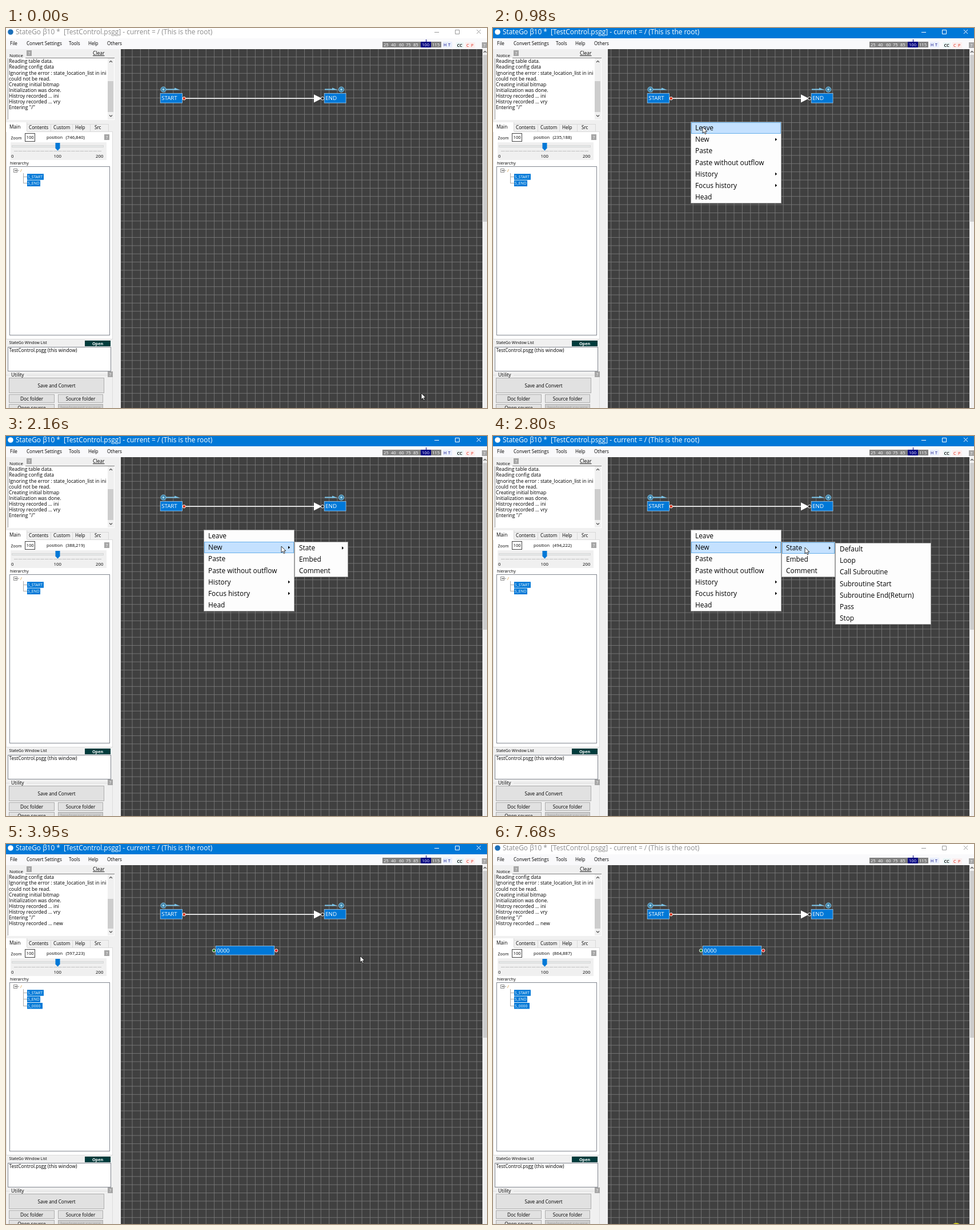
Recreate the animation shown at these times as an HTML page. Size 842 by 665 pixels, loop 7770 ms.

```html
<!DOCTYPE html>
<html lang="en">
<head>
<meta charset="utf-8">
<title>State editor</title>
<style>
html, body { margin: 0; width: 100%; height: 100%; overflow: hidden; background: #f0f0f0; }
svg { display: block; }
text { font-family: "Open Sans", "Noto Sans", sans-serif; white-space: pre; }
rect, .crisp { shape-rendering: crispEdges; }
.smooth { shape-rendering: geometricPrecision; }
</style>
</head>
<body>
<svg id="stage" width="842" height="665" viewBox="0 0 842 665"></svg>
<script>
const LOOP = 7770;
const BLUE = '#0078d7';
const stage = document.getElementById('stage');

function add(parent, tag, attrs, content) {
  const el = document.createElementNS('http://www.w3.org/2000/svg', tag);
  for (const k in attrs) el.setAttribute(k, attrs[k]);
  if (content !== undefined) el.textContent = content;
  parent.appendChild(el);
  return el;
}
const group = (parent = stage) => add(parent, 'g', {});
const show = (el, on) => el.setAttribute('visibility', on ? 'visible' : 'hidden');

// Edges are pixel coordinates; bordered boxes are inset by half a pixel.
function box(parent, x, y, w, h, fill, stroke) {
  const d = stroke ? 0.5 : 0;
  return add(parent, 'rect', { x: x + d, y: y + d, width: w - 2 * d, height: h - 2 * d, fill, stroke: stroke || 'none' });
}
const label = (parent, x, y, size, str, fill = '#000', more = {}) =>
  add(parent, 'text', { x, y, 'font-size': size, fill, ...more }, str);
const path = (parent, d, stroke, more = {}) => add(parent, 'path', { d, stroke, fill: 'none', ...more });
const dot = (parent, cx, cy, r, fill, stroke = 'none') => add(parent, 'circle', { cx, cy, r, fill, stroke });

function helpMark(x, y) {
  box(stage, x, y, 9, 10, '#a6a6a6');
  label(stage, x + 4.5, y + 8, 8, '?', '#fff', { 'text-anchor': 'middle' });
}
function button(x, y, w, h, str, fill = '#e1e1e1', color = '#000', size = 8.3) {
  box(stage, x, y, w, h, fill, '#adadad');
  label(stage, x + w / 2, y + h / 2 + 3, size, str, color, { 'text-anchor': 'middle' });
}
const chevron = (x, y, dir) => path(stage, `M${x - 2.5} ${y + dir}l2.5 ${-2.5 * dir}l2.5 ${2.5 * dir}`, '#505050', { 'stroke-width': 1.2 });

// Title bar
const titleBack = box(stage, 0, 0, 842, 18, '#fff');
const titleIcon = dot(stage, 8, 7, 4.8, BLUE);
const titleText = label(stage, 17, 11, 11.9, 'StateGo β10 *  [TestControl.psgg] - current = / (This is the root)');
const titleButtons = path(stage, 'M750 7.5h8M786.5 3.5h7v7h-7zM824 3l7 7M831 3l-7 7', '#999');

// Menu bar
box(stage, 0, 18, 842, 19, '#f9f9fb');
[[7, 'File'], [36, 'Convert Settings'], [110, 'Tools'], [144, 'Help'], [177, 'Others']]
  .forEach(([x, s]) => label(stage, x, 30.3, 8.1, s));
box(stage, 659, 24, 103, 10, '#808080');
box(stage, 726, 24, 18, 10, '#000080');
box(stage, 735, 20, 1, 4, '#000080');
[[661, 25], [674, 40], [688, 60], [700, 75], [713, 85], [728, 100], [746, 115]]
  .forEach(([x, s]) => label(stage, x, 31.7, 7.6, s, '#fff'));
box(stage, 765, 24, 16, 10, '#e8eefc');
box(stage, 804, 25, 17, 10, '#fbeeee');
box(stage, 788, 25, 13, 10, '#eaf6f6');
label(stage, 766, 31.7, 7, 'H', '#000080');
label(stage, 774, 31.7, 7, 'T', '#000080');
label(stage, 789.5, 32.8, 7.5, 'CC', '#000', { 'font-weight': 600 });
label(stage, 806, 32.8, 7, 'C', '#e02010');
label(stage, 814, 32.8, 7, 'P', '#e02010');
helpMark(833, 25);

// Side panel: notices
box(stage, 0, 37, 201, 628, '#f0f0f0');
helpMark(36, 39);
box(stage, 3, 52, 187, 109, '#fff');
box(stage, 34, 52, 156, 1, '#808080');
box(stage, 3, 53, 1, 107, '#a0a0a0');
label(stage, 6, 51.4, 8, 'Notice');
label(stage, 152, 47, 8.5, 'Clear', '#000', { 'text-decoration': 'underline' });
box(stage, 178, 53, 11, 107, '#f0f0f0');
chevron(183.5, 59, 1);
chevron(183.5, 153.5, -1);
const noticeThumb = box(stage, 178, 93, 10, 54, '#cdcdcd');
const notices = ['Reading table data.', 'Reading config data', 'Ignoring the error : state_location_list in ini',
  'could not be read.', 'Creating initial bitmap', 'Initialization was done.', 'Histroy recorded ... ini',
  'Histroy recorded ... vry', 'Entering "/"', 'Histroy recorded ... new'];
const noticeLines = notices.slice(0, 9).map((s, i) => label(stage, 5, 61.4 + i * 10.05, 8.6, s));

// Side panel: tabs
box(stage, 0, 181, 187, 364, '#fff', '#dcdcdc');
box(stage, 36, 168, 144, 14, '#f0f0f0', '#d9d9d9');
[78, 116, 147].forEach(x => box(stage, x, 168, 1, 13, '#d9d9d9'));
box(stage, 0, 165, 37, 17, '#fff');
box(stage, 36, 165, 1, 16, '#d9d9d9');
label(stage, 6, 176, 8.3, 'Main');
[[40, 'Contents'], [83, 'Custom'], [121, 'Help'], [155, 'Src']].forEach(([x, s]) => label(stage, x, 177.3, 8.15, s));
label(stage, 8.5, 194.5, 7, 'Zoom');
box(stage, 33, 184, 18, 15, '#fff', '#444');
label(stage, 35.5, 194.3, 7.7, '100');
label(stage, 71, 194, 7.45, 'position');
const posText = label(stage, 104.5, 194, 7.8, '');
helpMark(172, 186);
box(stage, 8, 200, 168, 31, '#f0f0f0');
box(stage, 10, 205, 161, 4, '#e7eaea', '#d6d6d6');
path(stage, 'M14 215.5H168', '#c0c0c0', { 'stroke-dasharray': '6.7 1' });
path(stage, 'M86.5 201h8v9.2l-4 4.6l-4-4.6z', 'none', { fill: BLUE });
[[9, 0], [83.5, 100], [157, 200]].forEach(([x, s]) => label(stage, x, 227.3, 7.8, s));

// Side panel: hierarchy
label(stage, 7, 239.3, 7.5, 'hierarchy');
box(stage, 6, 242, 176, 296, '#fff', '#828790');
box(stage, 13, 246, 7, 7, '#fff', '#919191');
path(stage, 'M14.5 249.5h4', '#444', { class: 'crisp' });
path(stage, 'M20 249.5h3M30.5 254v18M30 260.5h7M30 271.5h7', '#a8a8a8', { class: 'crisp' });
label(stage, 25, 252, 7.5, '/', '#d08a20');
function treeItem(parent, y, w, s) {
  box(parent, 37, y, w, 10.5, BLUE).setAttribute('class', 'smooth');
  label(parent, 38, y + 7.8, 6.8, s, '#fff');
}
treeItem(stage, 255.2, 29, 'S_START');
treeItem(stage, 266.6, 23, 'S_END');
const newItem = group();
path(newItem, 'M30.5 272v11.5h7', '#a8a8a8', { class: 'crisp' });
treeItem(newItem, 278, 27, 'S_0000');

// Side panel: window list and utility
label(stage, 5.5, 553.3, 6.9, 'StateGo Window List');
box(stage, 138, 547, 45, 10, '#003c3c');
label(stage, 160.5, 555, 7.2, 'Open', '#fff', { 'text-anchor': 'middle', 'font-weight': 700 });
box(stage, 3, 558, 181, 43, '#fff', '#828790');
label(stage, 5.5, 567, 8.4, 'TestControl.psgg (this window)');
path(stage, 'M0 607.5h6M36 607.5h150.5V665', '#dcdcdc', { class: 'crisp' });
label(stage, 9, 610, 8.4, 'Utility');
helpMark(178, 601);
button(5, 612, 167, 27, 'Save and Convert', '#e1e1e1', '#000', 8.15);
button(5, 641, 80, 15, 'Doc folder');
button(91, 641, 79, 15, 'Source folder');
button(5, 658, 80, 14, 'Open source');
button(91, 658, 79, 14, 'Implement source', '#cccccc', '#a0a0a0');

// Work area with a grid of 20 units, drawn slightly reduced
const SCALE = 1.393;
const PITCH = 20 / SCALE;
box(stage, 201, 37, 633, 628, '#404040');
let grid = '';
for (let x = 192.3 + PITCH; x < 834; x += PITCH) grid += `M${x} 37V665`;
for (let y = 36.3 + PITCH; y < 665; y += PITCH) grid += `M201 ${y}H834`;
path(stage, grid, '#7c7c7c', { 'stroke-width': 0.85 });
box(stage, 834, 37, 8, 628, '#f0f0f0');
box(stage, 835, 47, 7, 292, '#cdcdcd');
chevron(838.5, 42, 1);

function node(parent, x, y, w, h, s) {
  add(parent, 'rect', { x, y, width: w, height: h, fill: BLUE, stroke: '#a4d0f4', 'stroke-width': 0.8, class: 'smooth' });
  label(parent, x + 2, y + 11.5, 9.7, s, '#fff');
}
const port = (parent, x, y, fill) => dot(parent, x, y, 2.7, fill, '#fff');
function badge(ring, tail, tip) {
  dot(stage, ring, 107.6, 4.6, '#3f7fa4', '#86caec');
  dot(stage, ring, 107.6, 1.9, '#9cd8f4');
  path(stage, `M${tail} 107.5H${tip - 8}`, '#7cc4e8', { 'stroke-width': 2 });
  path(stage, `M${tip - 10} 104.5L${tip} 108.5H${tip - 10}z`, 'none', { fill: '#7cc4e8' });
}
badge(275.5, 280, 305);
badge(587, 558, 581);
path(stage, 'M314 123.3H541', '#fff', { 'stroke-width': 1.5 });
path(stage, 'M539 116.2L553 123.3L539 130.4z', 'none', { fill: '#fff' });
node(stage, 270.2, 114.5, 38.3, 16.6, 'START');
node(stage, 557.2, 114.5, 37.8, 16.6, 'END');
port(stage, 311.7, 123.3, '#d83018');
port(stage, 554.2, 123.3, '#202020');
const newNode = group();
node(newNode, 367.2, 178.5, 102.5, 15.6, '0000');
port(newNode, 364, 186.4, '#187818');
port(newNode, 473.2, 186.4, '#e01818');

// Context menus
function makeMenu(x, y, w, rows, parents, open) {
  const g = group();
  box(g, x, y, w, rows.length * 20.1 + 2, '#fdfdfd', '#a0a0a0');
  const mark = box(g, x + 1, y + 1, w - 2, 20, '#c4e1ff', '#68b0ea');
  rows.forEach((s, i) => {
    const cy = y + 11 + i * 20.1;
    label(g, x + 8, cy + 4.2, 11.85, s);
    if (parents.includes(i)) path(g, `M${x + w - 11} ${cy - 2.7}l3.2 2.7l-3.2 2.7z`, 'none', { fill: '#000' });
  });
  return { g, mark, x, y, w, open };
}
const CLOSE = 3730;
const menus = [
  makeMenu(346, 164, 159, ['Leave', 'New', 'Paste', 'Paste without outflow', 'History', 'Focus history', 'Head'], [1, 4, 5], 900),
  makeMenu(505, 185, 94, ['State', 'Embed', 'Comment'], [0], 1920),
  makeMenu(599, 187, 168, ['Default', 'Loop', 'Call Subroutine', 'Subroutine Start', 'Subroutine End(Return)', 'Pass', 'Stop'], [], 2630)
];

const flash = dot(stage, 811, 672, 9, '#d2cc1c');
const pointer = path(stage, 'M0 0V11L2.6 8.7L4.3 12.6L6.1 11.8L4.5 8H7.8z', '#000', { fill: '#fff', 'stroke-width': 0.8 });

// Bursts of movement: start, end, steps
const bursts = [[70, 680, 9], [830, 1530, 10], [1610, 2310, 10], [2400, 2860, 7],
  [3010, 3730, 10], [3950, 3950, 1], [6530, 7140, 9], [7370, 7450, 2]];
const ticks = [0];
for (const [a, b, n] of bursts)
  for (let k = 0; k < n; k++) ticks.push(a + Math.floor((b - a) * k / Math.max(1, n - 1) / 10) * 10);

// Pointer track: time, x, y
const track = [[-78, 726.8, 638.2], [0, 727, 639], [70, 722, 631], [300, 590, 470], [520, 420, 235],
  [680, 360.5, 170.8], [902, 360.5, 170.8], [980, 367, 173], [1200, 371, 180], [1530, 374, 191],
  [1700, 392, 193], [2072, 470.1, 193], [2150, 482, 193], [2310, 503, 193], [2400, 511, 194],
  [2702, 546.1, 195.1], [2780, 546.1, 195.1], [2860, 553, 195], [3010, 558, 195], [3300, 603, 196],
  [3600, 620, 196], [6400, 620, 196], [6452, 668, 350], [6530, 668, 350], [6750, 735, 500],
  [6950, 795, 630], [7062, 811.4, 673.4], [7140, 811.4, 673.4], [7290, 811.4, 672.8], [7372, 811.4, 672]];

function pointAt(t) {
  const i = track.findIndex(p => p[0] >= t);
  if (i === 0) return track[0].slice(1);
  if (i < 0) return track[track.length - 1].slice(1);
  const [a, b] = [track[i - 1], track[i]];
  const u = (t - a[0]) / (b[0] - a[0]);
  return [a[1] + (b[1] - a[1]) * u, a[2] + (b[2] - a[2]) * u];
}

function draw(t) {
  const tick = ticks.filter(s => s <= t).pop();
  const [x, y] = pointAt(tick);
  pointer.setAttribute('transform', `translate(${Math.round(x)} ${Math.round(y)})`);

  // The readout trails the pointer by one step.
  const [px, py] = pointAt(tick - 78);
  posText.textContent = `(${Math.round((px - 192) * 1.395)},${Math.round((py - 36) * 1.395)})`;

  const active = t >= 830 && t < 7680;
  titleBack.setAttribute('fill', active ? BLUE : '#fff');
  titleIcon.setAttribute('fill', active ? '#fff' : '#1c6fb8');
  titleText.setAttribute('fill', active ? '#fff' : '#8c8c8c');
  titleButtons.setAttribute('stroke', active ? '#fff' : '#999');

  const shift = t >= 3800 ? 1 : 0;
  noticeLines.forEach((el, i) => { el.textContent = notices[i + shift]; });
  noticeThumb.setAttribute('y', shift ? 96 : 93);
  noticeThumb.setAttribute('height', shift ? 52 : 54);

  menus.forEach((m, i) => {
    const on = t >= m.open && t < CLOSE;
    const inside = x >= m.x && x < m.x + m.w;
    const passed = x >= m.x + m.w;
    const row = i === 0 && (passed || y >= m.y + 21) ? 1 : 0;
    m.mark.setAttribute('y', m.y + 1.5 + row * 20);
    show(m.g, on);
    show(m.mark, on && (inside || passed));
  });

  show(newNode, t >= 3950);
  show(newItem, t >= 3950);
  show(flash, t >= 7680);
}

function loop() {
  draw(performance.now() % LOOP);
  requestAnimationFrame(loop);
}
loop();
</script>
</body>
</html>
```
